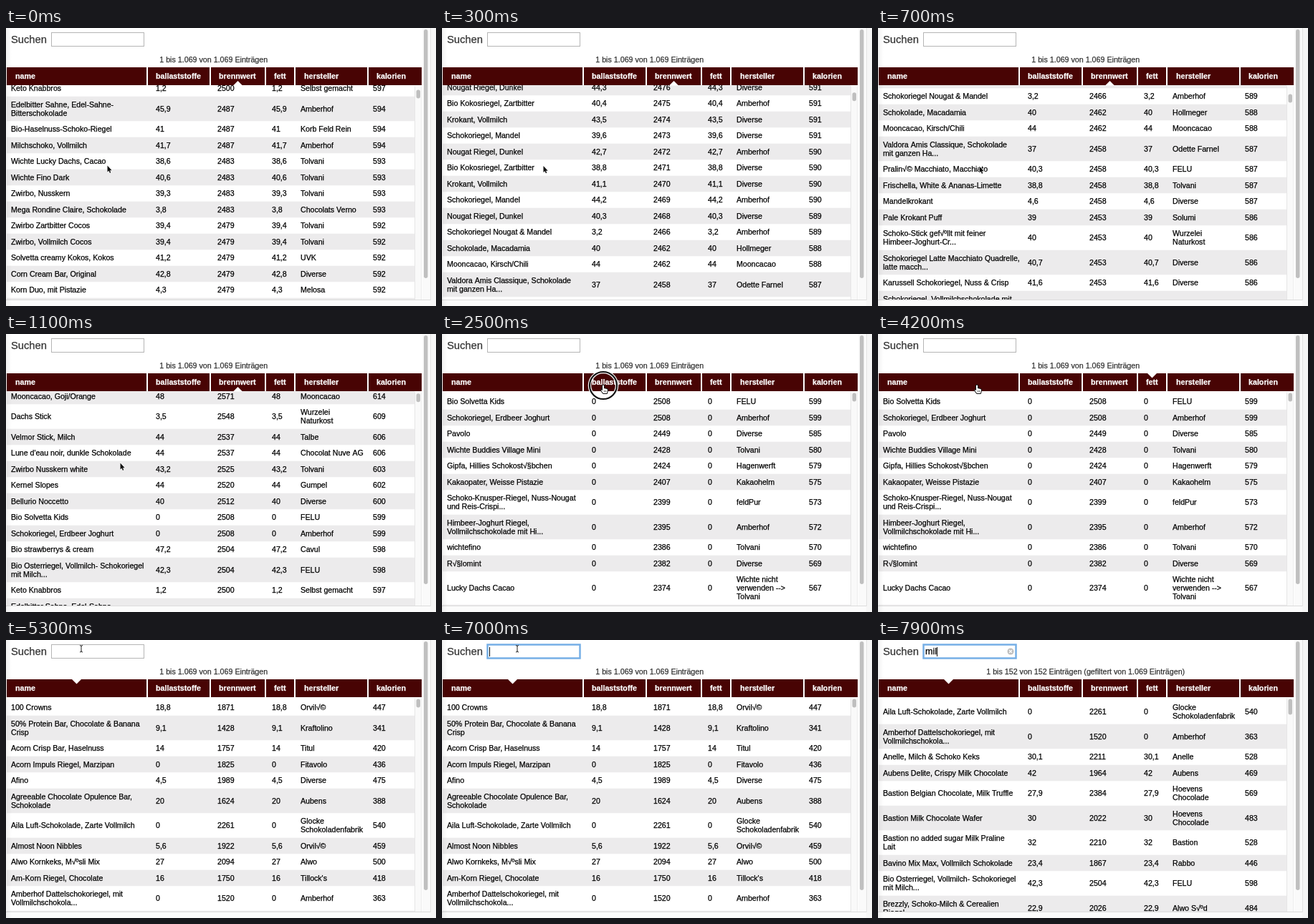
Recreate the animation shown at these times as an HTML page with a canvas. Size 600 by 389 pixels, loop 8000 ms.

```html
<!DOCTYPE html>
<html lang="de">
<head>
<meta charset="utf-8">
<title>Schokoriegel</title>
<style>
html, body { margin: 0; width: 100%; height: 100%; overflow: hidden; background: #fff; }
canvas { display: block; width: 600px; height: 389px; }
</style>
</head>
<body>
<canvas id="stage"></canvas>
<script>
const LOOP = 8000, STEP = 100, SANS = '"Liberation Sans", Arial, sans-serif';
const TOP = 80, BOTTOM = 380, LINE = 12, PAD = 10.5;
const canvas = document.getElementById('stage'), g = canvas.getContext('2d');
const ratio = window.devicePixelRatio || 1;
canvas.width = 600 * ratio;
canvas.height = 389 * ratio;
g.scale(ratio, ratio);

// One row per line: name; fibre (equals fat); energy; maker. "|" breaks a line.
const parse = text => text.trim().split('\n').map(line => {
  const [name, fibre, energy, maker] = line.split(';');
  return { cells: [name, fibre, energy, fibre, maker, String(Math.round(energy / 4.187))],
           fibre: parseFloat(fibre.replace(',', '.')) };
});

const flavours = ['Krokant, Vollmilch', 'Schokoriegel, Mandel', 'Nougat Riegel, Dunkel', 'Bio Kokosriegel, Zartbitter'];
const middle = Array.from({ length: 11 }, (_, i) =>
  `${flavours[i % 4]};${38 + i * 3 % 7},${1 + i % 8};${2478 - i};${i % 3 ? 'Diverse' : 'Amberhof'}`).join('\n');

const byEnergy = parse(`
Bio Nougatcreme Riegel;46;2610;Diverse
Macadamia Riegel, Vollmilch;47,5;2595;Amberhof
Mooncacao, Mandel/Feige;47;2580;Mooncacao
Mooncacao, Goji/Orange;48;2571;Mooncacao
Dachs Stick;3,5;2548;Wurzelei|Naturkost
Velmor Stick, Milch;44;2537;Talbe
Lune d'eau noir, dunkle Schokolade;44;2537;Chocolat Nuve AG
Zwirbo Nusskern white;43,2;2525;Tolvani
Kernel Slopes;44;2520;Gumpel
Bellurio Noccetto;40;2512;Diverse
Bio Solvetta Kids;0;2508;FELU
Schokoriegel, Erdbeer Joghurt;0;2508;Amberhof
Bio strawberrys & cream;47,2;2504;Cavul
Bio Osterriegel, Vollmilch- Schokoriegel|mit Milch...;42,3;2504;FELU
Keto Knabbros;1,2;2500;Selbst gemacht
Edelbitter Sahne, Edel-Sahne-|Bitterschokolade;45,9;2487;Amberhof
Bio-Haselnuss-Schoko-Riegel;41;2487;Korb Feld Rein
Milchschoko, Vollmilch;41,7;2487;Amberhof
Wichte Lucky Dachs, Cacao;38,6;2483;Tolvani
Wichte Fino Dark;40,6;2483;Tolvani
Zwirbo, Nusskern;39,3;2483;Tolvani
Mega Rondine Claire, Schokolade;3,8;2483;Chocolats Verno
Zwirbo Zartbitter Cocos;39,4;2479;Tolvani
Zwirbo, Vollmilch Cocos;39,4;2479;Tolvani
Solvetta creamy Kokos, Kokos;41,2;2479;UVK
Corn Cream Bar, Original;42,8;2479;Diverse
Korn Duo, mit Pistazie;4,3;2479;Melosa
${middle}
Schokoriegel Nougat & Mandel;3,2;2466;Amberhof
Schokolade, Macadamia;40;2462;Hollmeger
Mooncacao, Kirsch/Chili;44;2462;Mooncacao
Valdora Amis Classique, Schokolade|mit ganzen Ha...;37;2458;Odette Farnel
Pralin√© Macchiato, Macchiato;40,3;2458;FELU
Frischella, White & Ananas-Limette;38,8;2458;Tolvani
Mandelkrokant;4,6;2458;Diverse
Pale Krokant Puff;39;2453;Solumi
Schoko-Stick gef√ºllt mit feiner|Himbeer-Joghurt-Cr...;40;2453;Wurzelei|Naturkost
Schokoriegel Latte Macchiato Quadrelle,|latte macch...;40,7;2453;Diverse
Karussell Schokoriegel, Nuss & Crisp;41,6;2453;Diverse
Schokoriegel, Vollmilchschokolade mit|Nuss...;38,4;2453;Diverse`);

const zeros = parse(`
Pavolo;0;2449;Diverse
Wichte Buddies Village Mini;0;2428;Tolvani
Gipfa, Hillies Schokost√§bchen;0;2424;Hagenwerft
Kakaopater, Weisse Pistazie;0;2407;Kakaohelm
Schoko-Knusper-Riegel, Nuss-Nougat|und Reis-Crispi...;0;2399;feldPur
Himbeer-Joghurt Riegel,|Vollmilchschokolade mit Hi...;0;2395;Amberhof
wichtefino;0;2386;Tolvani
R√§lomint;0;2382;Diverse
Lucky Dachs Cacao;0;2374;Wichte nicht|verwenden -->|Tolvani`);

const byName = parse(`
100 Crowns;18,8;1871;Orvil√©
50% Protein Bar, Chocolate & Banana|Crisp;9,1;1428;Kraftolino
Acorn Crisp Bar, Haselnuss;14;1757;Titul
Acorn Impuls Riegel, Marzipan;0;1825;Fitavolo
Afino;4,5;1989;Diverse
Agreeable Chocolate Opulence Bar,|Schokolade;20;1624;Aubens
Aila Luft-Schokolade, Zarte Vollmilch;0;2261;Glocke|Schokoladenfabrik
Almost Noon Nibbles;5,6;1922;Orvil√©
Alwo Kornkeks, M√ºsli Mix;27;2094;Alwo
Am-Korn Riegel, Chocolate;16;1750;Tillock's
Amberhof Dattelschokoriegel, mit|Vollmilchschokola...;0;1520;Amberhof
Anelle, Milch & Schoko Keks;30,1;2211;Anelle
Aubens Delite, Crispy Milk Chocolate;42;1964;Aubens
Bastion Belgian Chocolate, Milk Truffle;27,9;2384;Hoevens|Chocolade
Bastion Milk Chocolate Wafer;30;2022;Hoevens|Chocolade
Bastion no added sugar Milk Praline|Lait;32;2210;Bastion
Bavino Mix Max, Vollmilch Schokolade;23,4;1867;Rabbo
Bio Osterriegel, Vollmilch- Schokoriegel|mit Milch...;42,3;2504;FELU
Brezzly, Schoko-Milch & Cerealien|Riegel;22,9;2026;Alwo S√ºd`);

const fibreUp = [...byEnergy.filter(r => !r.fibre), ...zeros, ...byName];
const fibreDown = [...byEnergy].sort((a, b) => b.fibre - a.fibre);

const columns = [ // left, right, heading x, cell x, heading
  [1, 196, 13, 7, 'name'], [198, 284, 209, 209, 'ballaststoffe'], [286, 361, 297, 295, 'brennwert'],
  [363, 402, 374, 371, 'fett'], [404, 504, 416, 411, 'hersteller'], [506, 580, 517, 512, 'kalorien']];

const sorts = [ // start, rows, marked column, ascending
  [0, byEnergy, 2, false], [2400, fibreUp, -1], [2600, fibreUp, 1, true],
  [3000, fibreDown, 1, false], [3800, fibreUp, 3, true], [4600, byName, 0, true]];
const queries = [[0, ''], [7300, 'm', 846], [7500, 'mi', 231], [7700, 'mil', 152]];
const scrollPath = [[0, 349], [200, 610], [400, 790], [600, 880], [700, 890], [800, 800], [900, 550], [1000, 270], [1100, 75], [1200, 15], [1300, 0]];
const pointerPath = [[0, 141, 192], [700, 141, 193], [900, 142, 193], [1100, 159, 180], [1600, 205, 110], [2200, 225, 72],
  [3100, 225, 72], [3600, 382, 72], [3900, 382, 72], [4200, 138, 72], [4700, 138, 72], [5200, 105, 12]];
const clicks = [2300, 2900, 3700, 4500], CLICK = 400;

const latest = (list, t) => list.filter(e => e[0] <= t).pop();

function along(path, t) {
  const i = path.findIndex(k => k[0] > t);
  if (i < 0) return path[path.length - 1].slice(1);
  const a = path[i - 1], b = path[i], p = (t - a[0]) / (b[0] - a[0]);
  return a.slice(1).map((v, k) => v + (b[k + 1] - v) * p);
}

function box(x, y, w, h, fill) {
  g.fillStyle = fill;
  g.fillRect(x, y, w, h);
}

// A hairline stroke gives the letters their slightly heavy look.
function text(str, x, y, size = 10.6, fill = '#000', weight = '') {
  g.font = `${weight} ${size}px ${SANS}`;
  g.fillStyle = g.strokeStyle = fill;
  g.lineWidth = .25;
  g.fillText(str, x, y + size * .35);
  g.strokeText(str, x, y + size * .35);
}

function pill(x, y, w, h, fill) {
  g.beginPath();
  g.roundRect(x, y, w, h, w / 2);
  g.fillStyle = fill;
  g.fill();
}

function shape(d, x, y, fill, stroke, width = 1) {
  g.save();
  g.translate(x, y);
  const p = new Path2D(d);
  g.lineJoin = 'round';
  g.lineWidth = width;
  if (stroke) { g.strokeStyle = stroke; g.stroke(p); }
  if (fill) { g.fillStyle = fill; g.fill(p); }
  g.restore();
}

function drawRows(rows, scroll) {
  g.save();
  g.beginPath();
  g.rect(1, TOP, 569, BOTTOM - TOP);
  g.clip();
  let y = 83.25 - scroll;
  rows.forEach((row, i) => {
    const cells = row.cells.map(c => c.split('|'));
    const h = LINE * Math.max(...cells.map(c => c.length)) + PAD;
    if (y + h > TOP && y < BOTTOM) {
      if (i % 2) box(1, y, 569, h, '#ecebec');
      cells.forEach((lines, c) => lines.forEach((line, k) =>
        text(line, columns[c][3], y + h / 2 + (k - (lines.length - 1) / 2) * LINE)));
    }
    y += h;
  });
  g.restore();
}

function drawHeader(marked, ascending) {
  columns.forEach(([left, right, x, , label], i) => {
    box(left, 55, right - left, 25, '#480404');
    if (i === marked) {
      const mid = (left + right) / 2;
      shape(ascending ? 'M-7 0H7L0 7Z' : 'M-6.5 0H6.5L0-6.5Z', mid, ascending ? 54.5 : 80.5, '#fff');
    }
    text(label, x, 67, 10.7, '#fff', 'bold');
  });
}

function drawSearch(t, query) {
  const focus = t >= 5600;
  text('Suchen', 7, 15.5, 14.7, '#333');
  g.lineWidth = focus ? 2.5 : 1;
  g.strokeStyle = focus ? '#76afe6' : '#b5b5b5';
  g.strokeRect(63.5, 6.5, 129, 19);
  text(query, 66, 16, 12.5);
  if (focus && (query || t % 1000 < 600)) box(66 + g.measureText(query).width, 10, 1, 13, '#111');
  if (query) {
    pill(180.5, 11.5, 9, 9, '#bdbdbd');
    shape('M-2-2L2 2M2-2L-2 2', 185, 16, null, '#fff', 1.2);
  }
}

function drawPointer(t) {
  if (t >= 7300) return;
  const [x, y] = along(pointerPath, t);
  const start = clicks.find(c => t >= c && t < c + CLICK);
  if (start !== undefined) {
    const p = (t - start) / CLICK;
    g.globalAlpha = Math.min(1, 2 - 2 * p);
    for (const [width, color] of [[4.5, '#fff'], [2.2, '#111']]) {
      g.beginPath();
      g.arc(x, y, 9 + 20 * p, 0, Math.PI * 2);
      g.lineWidth = width;
      g.strokeStyle = color;
      g.stroke();
    }
    g.globalAlpha = 1;
  }
  if (y < 27) {
    shape('M-2-4.5Q0-4.5 0-3Q0-4.5 2-4.5M0-3V4M-2 5Q0 5 0 3.5Q0 5 2 5', x, y, null, '#222');
  } else if (y > 54 && y < 81) {
    shape('M-1 0Q0-1 1 0V4L5 5Q6 5 6 6.5L5 11H0L-3 7Q-3 5.5-1 7Z', x, y, '#fff', '#111', 2);
    shape('M1.5 7V9M3.5 7V9', x, y, null, '#111', .7);
  } else {
    shape('M0 0V9L2 7.2 3.4 10.4 4.8 9.8 3.5 6.7H6.2Z', x + .5, y + .5, '#111', '#fff', 1.4);
  }
}

function draw(t) {
  const [, rows, marked, ascending] = latest(sorts, t);
  const [, query, count] = latest(queries, t);
  const [scroll] = t < 2400 ? along(scrollPath, t) : [0];
  const hits = query ? rows.filter(r => r.cells.join(' ').toLowerCase().includes(query)) : rows;

  box(0, 0, 600, 389, '#fff');
  box(581, 0, 11, 381, '#fafafa');
  box(592, 0, 8, 389, '#f6f6f6');
  box(0, 381, 592, 8, '#fbfbfb');
  pill(583, 2, 5.5, 348, '#c0c0c0');

  drawRows(hits, scroll);
  box(570, 81, 10, 299, '#f9f9f9');
  box(570, 81, 1, 299, '#e6e6e6');
  box(579, 81, 1, 299, '#ededed');
  pill(572.5, 82.5 + scroll / 90, 5.5, query ? 22 : 12, '#bfbfbf');
  box(0, 380, 592, 1, '#dcdcdc');
  box(592, 0, 1, 381, '#e4e4e4');

  drawHeader(marked, ascending);
  g.textAlign = 'center';
  text(query ? `1 bis ${count} von ${count} Einträgen (gefiltert von 1.069 Einträgen)`
             : '1 bis 1.069 von 1.069 Einträgen', 289.7, 44, 10.7, '#333');
  g.textAlign = 'left';
  drawSearch(t, query);

  const shade = g.createLinearGradient(0, 0, 8, 0);
  shade.addColorStop(0, '#0000000d');
  shade.addColorStop(1, '#0000');
  box(0, 0, 8, 389, shade);
  drawPointer(t);
}

const begin = performance.now();
function tick() {
  const t = (performance.now() - begin) % LOOP;
  draw(Math.floor(t / STEP) * STEP);
  requestAnimationFrame(tick);
}
tick();
</script>
</body>
</html>
```
